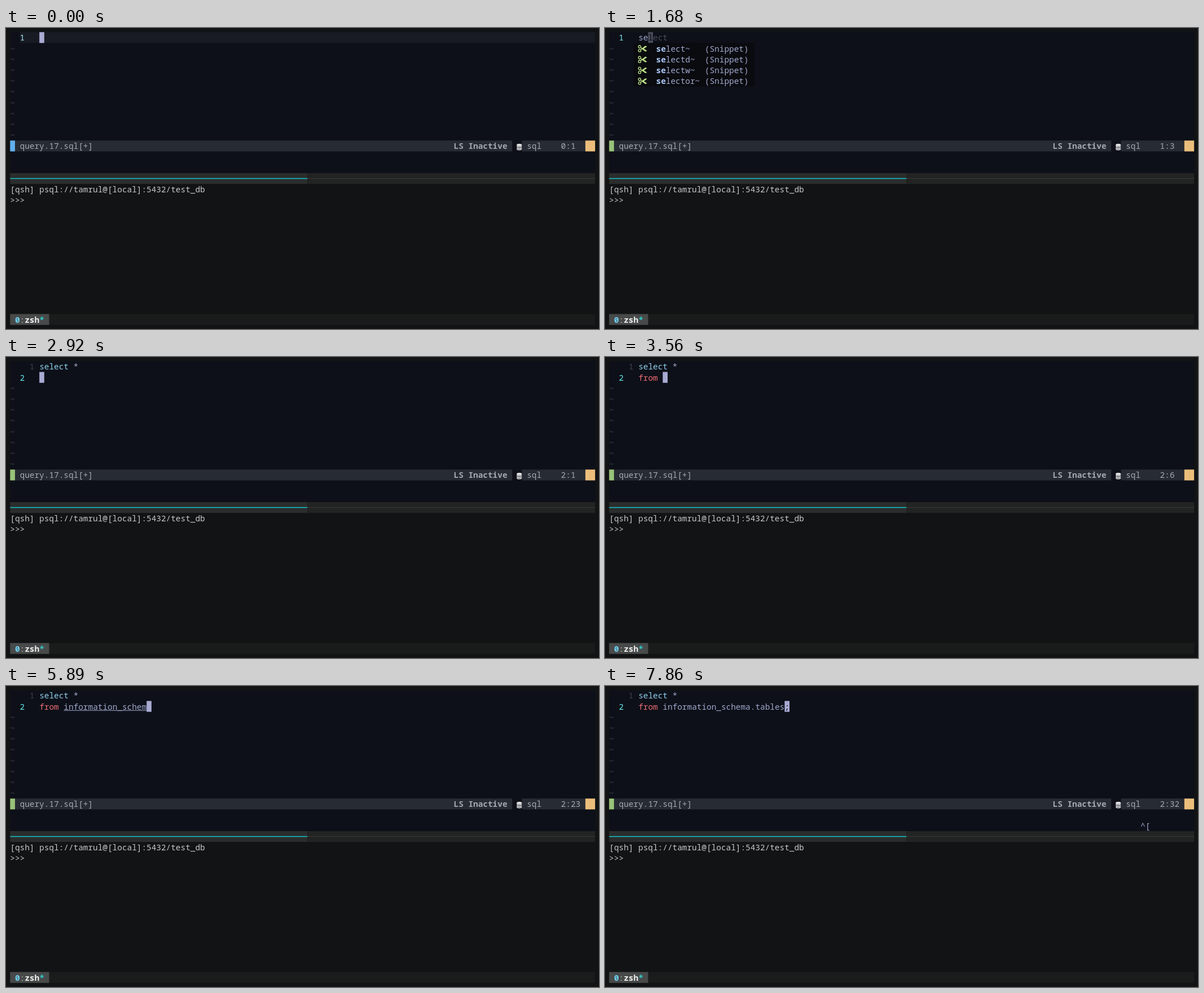
Recreate the animation shown at these times as an HTML page. Size 1051 by 533 pixels, loop 7.99 s.

```html
<!DOCTYPE html>
<html lang="en">
<head>
<meta charset="utf-8">
<title>SQL editor session</title>
<style>
html, body { margin: 0; width: 100%; height: 100%; overflow: hidden; background: #121314; }
svg { display: block; width: 1051px; height: 533px; }
text { font: 14.4px "Noto Sans Mono", "DejaVu Sans Mono", monospace; white-space: pre; }
.b { font-weight: 700; }
</style>
</head>
<body>
<svg viewBox="0 0 1051 533" xmlns="http://www.w3.org/2000/svg">
  <g id="base"></g>
  <g id="live"></g>
</svg>
<script>
const LOOP = 7990;
const CW = 8.64, RH = 19.2, PAD = 7.3;
const C = {
  editor: '#0d1018', line: '#191b24', bar: '#272b33', fg: '#a0a8cd', cursor: '#a9abd3',
  key: '#8fd0ee', from: '#ee6d75', ghost: '#4a4d59', dim: '#3c4050', term: '#c6c8c6', status: '#a5a9b0'
};

const X = col => PAD + col * CW;
const Y = row => PAD + row * RH;
const esc = s => s.replace(/&/g, '&amp;').replace(/</g, '&lt;').replace(/>/g, '&gt;');
const rect = (x, y, w, h, fill) =>
  `<rect x="${x.toFixed(2)}" y="${y.toFixed(2)}" width="${w.toFixed(2)}" height="${h.toFixed(2)}" fill="${fill}"/>`;
const cells = (col, row, n, fill) => rect(X(col), Y(row), n * CW, RH, fill);
const label = (x, row, s, fill, bold) =>
  `<text x="${x.toFixed(2)}" y="${(Y(row) + 15).toFixed(2)}" fill="${fill}"${bold ? ' class="b"' : ''}>${esc(s)}</text>`;
const put = (col, row, s, fill, bold) => label(X(col), row, s, fill, bold);

// Text in the buffer after each key press
const FIRST = [
  [1440, 's'], [1680, 'se'], [1740, 'sel'], [1800, 'sele'], [1870, 'selec'],
  [1930, 'select'], [2060, 'select '], [2590, 'select *']
];
const SECOND = [
  [3250, 'f'], [3380, 'fr'], [3440, 'from'], [3560, 'from '],
  [4160, 'i'], [4290, 'in'], [4350, 'inf'], [4410, 'infor'], [4540, 'inform'], [4600, 'informa'],
  [4800, 'informat'], [4860, 'informati'], [4990, 'information'], [5250, 'information_'],
  [5440, 'information_s'], [5570, 'information_sc'], [5700, 'information_sch'],
  [5760, 'information_sche'], [5890, 'information_schem'], [6020, 'information_schema'],
  [6150, 'information_schema.'], [6350, 'information_schema.t'], [6550, 'information_schema.ta'],
  [6680, 'information_schema.tab'], [6740, 'information_schema.tabl'],
  [6870, 'information_schema.tables'], [7000, 'information_schema.tables;']
].map(([at, s]) => [at, at > 3560 ? 'from ' + s : s]);
const INSERT = 920, POPUP = 1500, POPUP_END = 2060, NEWLINE = 2920, ESCAPE = 7860;

const textAt = (keys, t) => keys.reduce((s, [at, v]) => (t >= at ? v : s), '');

function disks() {
  let s = '<g fill="#e4e5e6"><ellipse cx="909.7" cy="206.9" rx="4.6" ry="2"/>';
  for (let y = 208.3; y < 214; y += 2.6)
    s += `<path d="M905.1 ${y}q4.6 2.6 9.2 0v1.5q-1 1.5-4.6 1.5t-4.6-1.5z"/>`;
  return s + '</g>';
}

function scissors(row) {
  return `<g transform="translate(58 ${(Y(row) + 10).toFixed(2)})" fill="none" stroke="#c3e88d" stroke-width="1.3">
    <circle cx="3.4" cy="-3.3" r="2.2"/><circle cx="3.4" cy="3.5" r="2.2"/>
    <path d="M5.2-2 L13.5 4.4 L15.2 3.8 L8.6 -.6M5.2 2.2 L13.5-4.2 L15.2-3.6 L8.6 .8"/></g>`;
}

function base() {
  const edge = 534.4, end = X(120);
  return rect(PAD, PAD, 120 * CW, 13 * RH, C.editor) +
    cells(2, 10, 101, C.bar) + cells(1, 10, 1, C.bar) + cells(105, 10, 13, C.bar) +
    put(2, 10, 'query.17.sql[+]', C.status) +
    put(91, 10, 'LS Inactive', C.status, true) + disks() +
    put(106, 10, 'sql', C.status) +
    cells(118, 10, 2, '#ecbe7b') + rect(X(119) - .2, Y(10), .5, RH, '#dfb273') +
    rect(PAD, Y(13), edge - PAD, RH, '#2b2c2c') + rect(edge, Y(13), end - edge, RH, '#222323') +
    rect(PAD, 265.8, edge - PAD, 1.5, '#18c5c8') + rect(edge, 266, end - edge, 1, '#3a3935') +
    put(0, 14, '[qsh] psql://tamrul@[local]:5432/test_db', C.term) +
    put(0, 15, '>>>', C.term) +
    cells(0, 26, 120, '#1a1b1b') + cells(0, 26, 8, '#484a4a') +
    put(1, 26, '0', '#70d5f6', true) + put(2, 26, ':', '#a9acac') +
    put(3, 26, 'zsh', '#f0f1f1', true) + put(6, 26, '*', '#2fd0d0', true);
}

function popup(typed) {
  const items = ['select', 'selectd', 'selectw', 'selector'], x = 90.5, n = typed.length;
  let s = rect(51, Y(1), 213.8, items.length * RH, '#0a0b0f');
  items.forEach((word, i) => {
    const row = i + 1;
    s += scissors(row) + label(x, row, typed, '#aecbff', true) +
      label(x + n * CW, row, (word + '~').slice(n).padEnd(10 - n) + '(Snippet)', C.fg);
  });
  return s;
}

function secondLine(s) {
  const isFrom = s.startsWith('from');
  let out = put(6, 1, s.slice(0, 5), isFrom ? C.from : C.fg) + put(11, 1, s.slice(5), C.fg);
  // The identifier before the cursor is underlined
  const word = /\w*$/.exec(s.slice(5))[0];
  if (word.length > 1)
    out += rect(X(6 + s.length - word.length), Y(1) + 16.3, word.length * CW, 1, C.fg);
  return out;
}

function live(t) {
  const a = textAt(FIRST, t), b = textAt(SECOND, t);
  const two = t >= NEWLINE, open = t >= POPUP && t < POPUP_END;
  const ghost = open ? 'select'.slice(a.length) : '';
  const row = two ? 1 : 0, len = (two ? b : a).length;
  const escaped = t >= ESCAPE;
  const col = 6 + len - (escaped ? 1 : 0);
  let s = '';

  if (!a) s += cells(2, 0, 118, C.line);
  for (let r = row + 1; r < 10; r++) s += put(0, r, '~', C.dim);
  if (two) s += put(4, 0, '1', C.dim) + put(2, 1, '2', '#62eeee');
  else s += put(2, 0, '1', a ? '#80e8ee' : '#a2e2ee');

  s += put(6, 0, a.slice(0, 6), a.length >= 6 ? C.key : C.fg) + put(13, 0, a.slice(7), C.fg);
  if (two) s += secondLine(b);
  if (ghost) s += put(col, 0, ghost, C.ghost);
  s += cells(col, row, 1, ghost ? C.ghost : C.cursor);
  if (ghost) s += put(col, 0, ghost[0], C.editor);
  if (escaped) s += put(col, 1, ';', C.editor);
  if (open) s += popup(a);

  s += cells(0, 10, 1, t < INSERT ? '#61afef' : '#98c379');
  s += put(113, 10, two ? `2:${len + 1}` : a ? `1:${len + 1}` : '0:1', C.status);
  if (escaped) s += put(109, 12, '^[', C.fg);
  else if (t >= 860 && t < INSERT) s += put(109, 12, 'i', C.fg);
  return s;
}

const layer = document.getElementById('live');
document.getElementById('base').innerHTML = base();
let shown = '';
function draw(t) {
  const s = live(t);
  if (s !== shown) layer.innerHTML = shown = s;
}

const start = performance.now();
function tick() {
  draw((performance.now() - start) % LOOP);
  requestAnimationFrame(tick);
}
tick();
</script>
</body>
</html>
```
